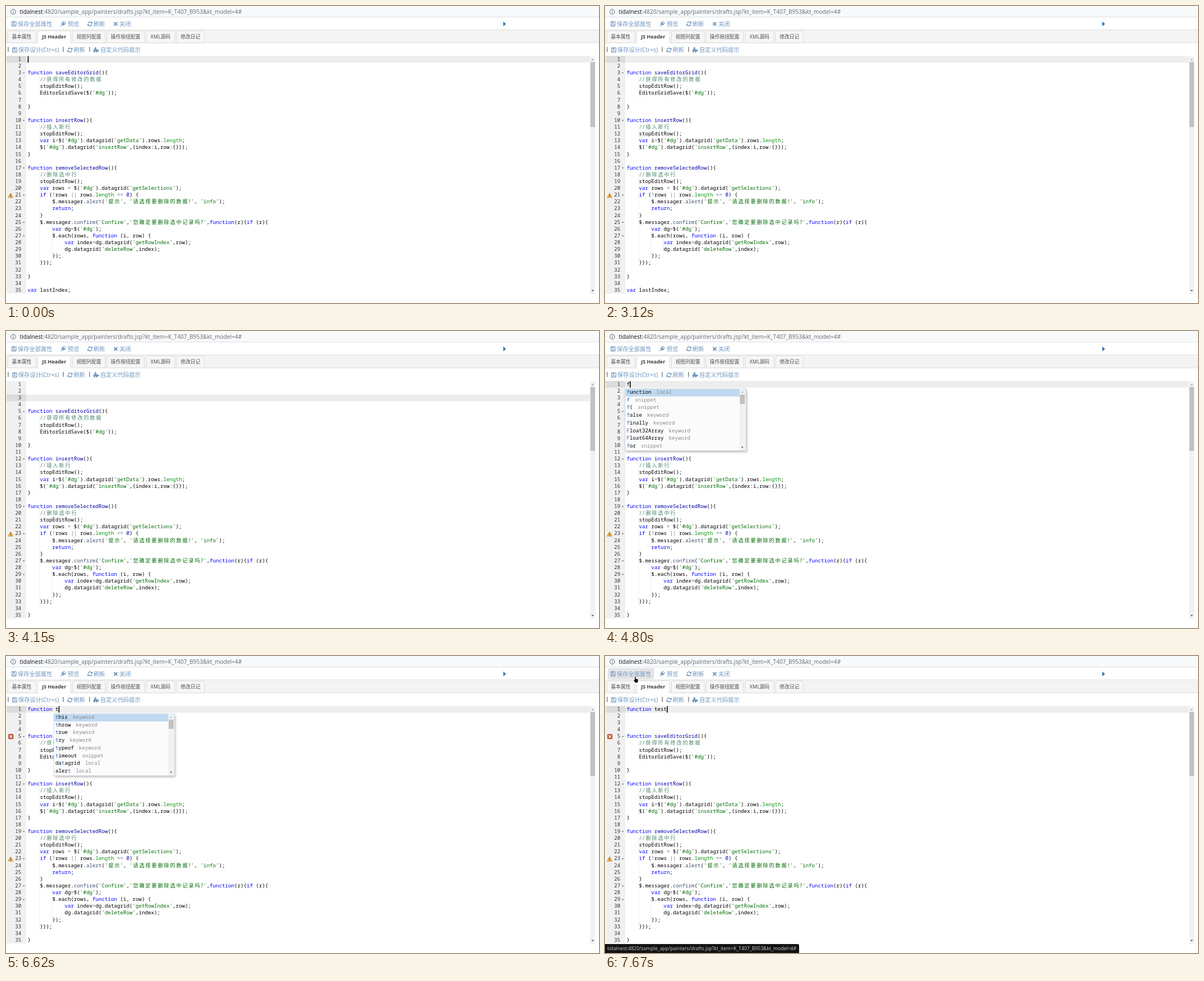
Recreate the animation shown at these times as an HTML page with a canvas. Size 1057 px wide and 530 px high, loop 8000 ms.

```html
<!DOCTYPE html>
<html lang="zh">
<head>
<meta charset="utf-8">
<title>Code editor</title>
<style>
html, body { margin: 0; width: 100%; height: 100%; overflow: hidden; background: #fff; }
canvas { display: block; width: 1057px; height: 530px; }
</style>
</head>
<body>
<canvas id="stage"></canvas>
<script>
const W = 1057, H = 530, LOOP = 8000;
const canvas = document.getElementById('stage');
const dpr = window.devicePixelRatio || 1;
canvas.width = W * dpr;
canvas.height = H * dpr;
const c = canvas.getContext('2d');

const SANS = '"Noto Sans", "Noto Sans CJK SC", "Noto Sans CJK", sans-serif';
const MONO = '"Noto Sans Mono", "Noto Sans CJK SC", "Noto Sans CJK", monospace';
const CODE_FONT = '9.17px ' + MONO;
const LEFT = 38.5, TOP = 89, CELL = 5.5, ROW = 12.118, ROWS = 35, BOTTOM = 513.6;
const BLUE = '#7096bf';
const HOST = 'tidalnest';
const PATH = ':4820/sample_app/painters/drafts.jsp?kt_item=K_T407_B953&kt_model=4#';

const CODE = `
function saveEditorGrid(){
    //获得所有修改的数据
    stopEditRow();
    EditorGridSave($('#dg'));

}

function insertRow(){
    //插入新行
    stopEditRow();
    var i=$('#dg').datagrid('getData').rows.length;
    $('#dg').datagrid('insertRow',{index:i,row:{}});
}

function removeSelectedRow(){
    //删除选中行
    stopEditRow();
    var rows = $('#dg').datagrid('getSelections');
    if (!rows || rows.length == 0) {
        $.messager.alert('提示', '请选择要删除的数据!', 'info');
        return;
    }
    $.messager.confirm('Confirm','您确定要删除选中记录吗?',function(r){if (r){
        var dg=$('#dg');
        $.each(rows, function (i, row) {
            var index=dg.datagrid('getRowIndex',row);
            dg.datagrid('deleteRow',index);
        });
    }});

}

var lastIndex;`.split('\n');

const TOKENS = [
  [/^\/\/.*/, '#4c886b'],
  [/^'[^']*'/, '#036a07'],
  [/^(function|var|if|return)\b/, '#0000ff'],
  [/^length\b/, '#06960e'],
  [/^(alert|confirm)\b/, '#3c4c72'],
  [/^\d+/, '#0000cd'],
  [/^[=!|]+/, '#687687'],
  [/^\w+/, '#000'],
  [/^\s+/, '#000'],
  [/^[^\w\s'=!|]/, '#000']
];

// Each list holds [start time, value] pairs.
const TYPED = [[0, ''], [4800, 'f'], [4970, 'fu'], [5050, 'fun'], [5130, 'func'],
  [5660, 'function'], [6260, 'function '], [6620, 'function t'], [6770, 'function te'],
  [6930, 'function tes'], [6990, 'function test'], [7120, 'function test '], [7670, 'function test']];
const CARET_ROW = [[0, 0], [3370, 1], [3470, 2], [4180, 1], [4270, 0]];
const CARET_ON = [[0, 1], [180, 0], [560, 1], [1140, 0], [1540, 1], [2130, 0], [2530, 1],
  [3120, 0], [3370, 1], [4090, 0], [4180, 1], [6180, 0], [6260, 1], [7610, 0], [7670, 1]];
const ADDED = [[0, 0], [3370, 1], [3470, 2]];
const POPUP = [[0, ''], [4800, 'f'], [4970, 'fu'], [5130, 'func'], [5660, ''],
  [6620, 't'], [6770, 'te'], [6930, 'tes'], [6990, '']];
const LISTS = {
  f: ['function local', 'f snippet', 'f( snippet', 'false keyword', 'finally keyword',
    'Float32Array keyword', 'Float64Array keyword', 'for snippet'],
  fu: ['function local', 'fun snippet', 'f( snippet', 'function keyword', 'Function keyword',
    'default keyword', 'false keyword', 'finally keyword'],
  func: ['function local', 'fun snippet', 'f( snippet', 'function keyword', 'Function keyword',
    'for snippet', 'forin snippet'],
  t: ['this keyword', 'throw keyword', 'true keyword', 'try keyword', 'typeof keyword',
    'timeout snippet', 'datagrid local', 'alert local'],
  te: ['getSelections local', 'getChanges local', 'deleteRow local', 'insertRow local',
    'extends keyword', 'byte keyword'],
  tes: ['getSelections local', 'getChanges local', 'extends keyword']
};

const at = (list, t) => list.reduce((v, [start, next]) => t >= start ? next : v, list[0][1]);

function box(x, y, w, h, fill) {
  c.fillStyle = fill;
  c.fillRect(x, y, w, h);
}

function text(s, x, y, font, color, align = 'left') {
  c.font = font;
  c.fillStyle = color;
  c.textAlign = align;
  c.fillText(s, x, y);
}

function shape(points, fill, stroke, width = 1) {
  c.beginPath();
  points.forEach(([x, y]) => c.lineTo(x, y));
  c.closePath();
  if (stroke) { c.strokeStyle = stroke; c.lineWidth = width; c.lineJoin = 'round'; c.stroke(); }
  if (fill) { c.fillStyle = fill; c.fill(); }
}

function line(points, color, width) {
  c.beginPath();
  points.forEach(([x, y]) => c.lineTo(x, y));
  c.strokeStyle = color;
  c.lineWidth = width;
  c.stroke();
}

// dir 1 points down, -1 points up
const arrow = (x, y, r, dir, color) =>
  shape([[x - r, y - dir * r / 2], [x + r, y - dir * r / 2], [x, y + dir * r / 2]], color);

// Monospaced text; wide characters take two cells.
function mono(s, x, y, color) {
  for (const part of s.match(/[\x20-\x7e]+|[^\x20-\x7e]/g) || []) {
    const wide = part.charCodeAt(0) > 126;
    text(part, wide ? x + CELL : x, y, CODE_FONT, color, wide ? 'center' : 'left');
    x += CELL * (wide ? 2 : part.length);
  }
  return x;
}

function codeLine(s, y) {
  const name = (s.match(/^function (\w+)\(/) || [])[1];
  let x = LEFT;
  while (s) {
    const [rule, color] = TOKENS.find(([r]) => r.test(s)) || [/^./, '#000'];
    const token = s.match(rule)[0];
    x = mono(token, x, y, token === name ? '#0000a2' : color);
    s = s.slice(token.length);
  }
}

function saveIcon(x, y) {
  c.strokeStyle = BLUE;
  c.lineWidth = 1;
  c.strokeRect(x + .5, y + .5, 8, 8);
  c.strokeRect(x + 2.5, y + 5.3, 4, 3.2);
  box(x + 2.2, y + .8, 4, 2.6, BLUE);
  box(x + 4.4, y + 1.1, 1, 1.6, '#fff');
}

function refreshIcon(x, y) {
  c.strokeStyle = BLUE;
  c.lineWidth = 1.5;
  for (const a of [0, Math.PI]) {
    c.beginPath();
    c.arc(x, y, 3.5, a + 3.4, a + 5.7);
    c.stroke();
  }
  shape([[x + 4.7, y - 4.2], [x + 4.7, y - .6], [x + 1.1, y - .6]], BLUE);
  shape([[x - 4.7, y + 4.2], [x - 4.7, y + .6], [x - 1.1, y + .6]], BLUE);
}

function plugIcon(x, y) {
  c.save();
  c.translate(x, y);
  c.rotate(Math.PI / 4);
  box(-3.5, -1.8, 7, 1.3, BLUE);
  box(-2.4, -5, 1.3, 3.5, BLUE);
  box(1.1, -5, 1.3, 3.5, BLUE);
  c.beginPath();
  c.arc(0, -.5, 3, 0, Math.PI);
  c.fill();
  box(-.6, 2, 1.2, 4, BLUE);
  c.restore();
}

function puzzleIcon(x, y) {
  box(x, y + 4, 7, 5.5, BLUE);
  for (const [dx, dy] of [[3.4, 2], [8.2, 6.4]]) {
    c.beginPath();
    c.arc(x + dx, y + dy, 1.7, 0, 7);
    c.fill();
  }
  box(x + 2.7, y + 2, 1.5, 3, BLUE);
  box(x + 2.6, y + 7.4, 1.7, 2.1, '#fff');
}

function header(hover) {
  box(0, 0, W, H, '#fff');
  box(0, 0, W, 19.5, '#f8f9fa');
  box(0, 19.3, W, .9, '#d9dbde');
  c.strokeStyle = '#5f6368';
  c.lineWidth = 1;
  c.beginPath();
  c.arc(13, 10.2, 4.3, 0, 7);
  c.stroke();
  box(12.5, 9.6, 1, 3, '#5f6368');
  box(12.5, 7.7, 1, 1.1, '#5f6368');
  const font = '10.15px ' + SANS;
  text(HOST, 24.5, 13.7, font, '#202124');
  text(PATH, 24.5 + c.measureText(HOST).width, 13.7, font, '#70757a');

  if (hover) {
    c.beginPath();
    c.roundRect(5.5, 22.5, 81.5, 18.2, 3);
    c.fillStyle = '#e6e6e6';
    c.fill();
    c.strokeStyle = '#d2d2d2';
    c.lineWidth = .8;
    c.stroke();
  }
  const tool = '10.25px ' + SANS;
  saveIcon(9.7, 27.3);
  plugIcon(102, 31.7);
  refreshIcon(149.7, 31.8);
  line([[192.5, 29], [198.5, 35]], BLUE, 2);
  line([[198.5, 29], [192.5, 35]], BLUE, 2);
  for (const [s, x] of [['保存全部属性', 21], ['预览', 110], ['刷新', 156], ['关闭', 202]])
    text(s, x, 35.6, tool, BLUE);
  shape([[886.6, 28], [891, 32], [886.6, 36]], '#2f76b5', '#8bb4d8', .7);

  box(0, 42, W, 24, '#f3f3f3');
  box(0, 42, W, .8, '#dcdcdc');
  box(0, 65.5, W, .8, '#dcdcdc');
  const tabs = [['基本属性', 3, 53], ['JS Header', 56.5, 115], ['视图列配置', 118.5, 177],
    ['操作按扭配置', 180, 246.5], ['XML源码', 250, 301], ['修改日记', 304, 353.5]];
  for (const [s, x, right] of tabs) {
    const active = s === 'JS Header';
    c.beginPath();
    c.roundRect(x, 44.5, right - x, active ? 22.5 : 21.2, [3, 3, 0, 0]);
    c.fillStyle = active ? '#fff' : '#f6f6f6';
    c.fill();
    c.strokeStyle = '#d8d8d8';
    c.lineWidth = .8;
    c.stroke();
    if (active) box(x + .4, 65, right - x - .8, 3, '#fff');
    text(s, (x + right) / 2, 57.8, (active ? 'bold 9px ' : '8.8px ') + SANS,
      active ? '#404040' : '#4d4d4d', 'center');
  }

  for (const x of [3.5, 101.6, 148.5]) box(x, 73, .9, 9, '#333');
  saveIcon(11, 74);
  refreshIcon(114, 78.5);
  puzzleIcon(156, 73.2);
  for (const [s, x] of [['保存设计(Ctr+s)', 22], ['刷新', 120.5], ['自定义代码提示', 168]])
    text(s, x, 82, tool, BLUE);
}

function warningIcon(y) {
  shape([[8.2, y + 2.5], [12.8, y + 10.5], [3.6, y + 10.5]], '#eeb04e', '#b9772a', .8);
  box(7.7, y + 5, 1, 3, '#4a3210');
  box(7.7, y + 8.7, 1, 1, '#4a3210');
}

function errorIcon(y) {
  c.beginPath();
  c.roundRect(4.2, y + 1.8, 9, 9, 1.2);
  c.fillStyle = '#b8512c';
  c.fill();
  line([[6.5, y + 4.1], [10.9, y + 8.5]], '#fff', 1.4);
  line([[10.9, y + 4.1], [6.5, y + 8.5]], '#fff', 1.4);
}

function editor(t) {
  const added = at(ADDED, t), active = at(CARET_ROW, t), typed = at(TYPED, t);
  const lines = [typed, ...Array(added + 1).fill(''), ...CODE.slice(1)];
  const activeY = TOP + active * ROW;
  c.save();
  c.beginPath();
  c.rect(0, TOP, W, BOTTOM - TOP);
  c.clip();
  box(1, TOP, 35, BOTTOM - TOP, '#f0f0f0');
  box(1, activeY, 35, ROW, '#dcdcdc');
  box(36, activeY, 1004.5, ROW, '#ededed');

  for (let i = 0; i < ROWS; i++) {
    const y = TOP + i * ROW, base = y + 8.9, s = lines[i] || '';
    text(i + 1, 27.2, base, CODE_FONT, '#333', 'right');
    if (i && /\{$/.test(s) && !/\}$/.test(s)
        && !/^ +if/.test(s) || /^ +if/.test(s)) arrow(31.7, y + 6.4, 1.9, 1, '#666');
    if (/^ +if/.test(s)) warningIcon(y);
    const depth = Math.floor(s.search(/\S/) / 4);
    for (let k = 1; k <= depth; k++)
      for (let d = 0; d < ROW; d += 1.5) box(LEFT + 22 * k - .9, y + d, .7, .75, '#d0d0d0');
    codeLine(s, base);
  }
  if (t >= 5300 && t < 6350)
    text('i', 8.5, TOP + 9.2, 'italic bold 8px "Noto Serif", serif', '#555', 'center');
  if (t >= 6350) errorIcon(TOP + 4 * ROW);

  if (at(CARET_ON, t)) {
    const col = active ? 0 : typed.length;
    box(LEFT + .2 + col * CELL, activeY + .5, 1.6, ROW - .6, '#000');
  }
  c.restore();

  box(1041, 90, 9.5, 424, '#f1f1f1');
  box(1041.7, 100, 8.2, 116 - added, '#c1c1c1');
  arrow(1045.7, 95.5, 2.4, -1, '#a3a3a3');
  arrow(1045.7, 508, 2.4, 1, '#505050');
}

function popup(prefix, col) {
  const rows = LISTS[prefix], pitch = 13.72;
  const x = LEFT - 2.8 + col * CELL, y = 103, w = 215.5, h = rows.length * pitch + .8;
  c.save();
  c.shadowColor = 'rgba(0,0,0,.28)';
  c.shadowOffsetX = 1.5 * dpr;
  c.shadowOffsetY = 2 * dpr;
  c.shadowBlur = 4 * dpr;
  box(x, y, w, h, '#fbfbfb');
  c.restore();
  c.strokeStyle = '#d3d3d3';
  c.lineWidth = .8;
  c.strokeRect(x, y, w, h);
  box(x + .4, y + .4, w - .8, pitch - .3, '#c0d9f0');
  rows.forEach((row, i) => {
    const [word, kind] = row.split(' ');
    const base = y + i * pitch + 8.9;
    let next = 0, px = x + 2.8;
    for (const ch of word) {
      const hit = next < prefix.length && ch.toLowerCase() === prefix[next];
      if (hit) next++;
      px = mono(ch, px, base, hit ? '#2d69c7' : '#000');
    }
    mono(kind, px + 9, base, '#8a8a8a');
  });
  if (rows.length > 6) {
    const mid = x + w - 6.4;
    box(mid - 5, y + .5, 10.6, h - 1, '#f1f1f1');
    box(mid - 4.2, y + 10.5, 8.6, 16.5, '#c1c1c1');
    arrow(mid, y + 6, 2.2, -1, '#a3a3a3');
    arrow(mid, y + h - 6, 2.2, 1, '#505050');
  }
}

function status() {
  c.beginPath();
  c.roundRect(-1, 514, 347, 17, [0, 3, 0, 0]);
  c.fillStyle = '#131313';
  c.fill();
  text(HOST + PATH, 4, 525.4, '8.65px ' + SANS, '#c4c4c4');
}

function pointer(t) {
  if (t >= 620 && t < 800) {
    const y = t < 680 ? 88 : t < 740 ? 86 : 83.5;
    line([[57.5, y], [57.5, y + 11]], '#333', 1);
    line([[55.5, y], [59.5, y]], '#333', 1);
    line([[55.5, y + 11], [59.5, y + 11]], '#333', 1);
  } else if (t >= 7060 && t < 7180) {
    const [x, y] = t < 7120 ? [479, 128] : [220, 62];
    shape([[x, y], [x, y + 12], [x + 3, y + 9.2], [x + 8, y + 9]], '#111', '#fff', 1.4);
  } else if (t >= 7180) {
    c.save();
    c.translate(t < 7240 ? 62 : 51.5, 36.5);
    shape([[1.6, 0], [3, .4], [3.2, 4], [7, 5], [7.4, 7], [6.6, 11], [2.6, 11],
      [-.4, 7.2], [.2, 6.2], [1.4, 7]], '#111', '#fff', 1.5);
    c.restore();
  }
}

function frame(now) {
  const t = now % LOOP;
  c.setTransform(dpr, 0, 0, dpr, 0, 0);
  c.textBaseline = 'alphabetic';
  header(t >= 7180);
  editor(t);
  const prefix = at(POPUP, t);
  if (prefix) popup(prefix, t < 6000 ? 0 : 9);
  if (t >= 7180) status();
  pointer(t);
}

const start = performance.now();
function tick() {
  frame(performance.now() - start);
  requestAnimationFrame(tick);
}
tick();
</script>
</body>
</html>
```
